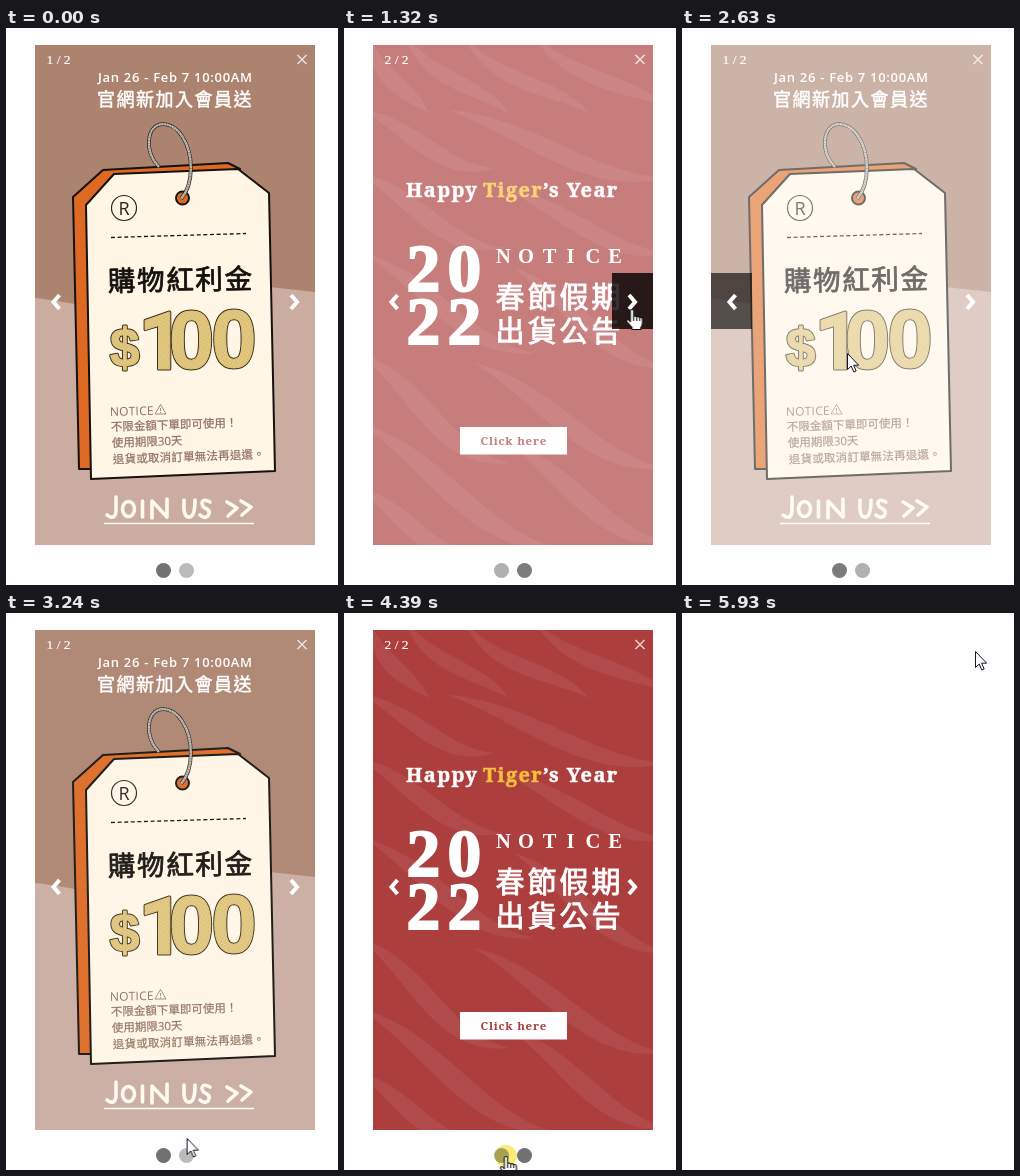
Recreate the animation shown at these times as an HTML page. Size 332x557 px, loop 6080 ms.

```html
<!DOCTYPE html>
<html lang="zh-Hant">
<head>
<meta charset="utf-8">
<title>Popup slideshow</title>
<style>
html, body { margin: 0; width: 100%; height: 100%; overflow: hidden; background: #fefefe; }
svg { display: block; width: 100%; height: 100%; }
text { white-space: pre; }

.sans { font-family: "Open Sans", "Noto Sans", sans-serif; }
.cjk { font-family: "Open Sans", "Noto Sans CJK TC", "Noto Sans CJK JP", "Noto Sans CJK", sans-serif; }
.didone { font-family: "Liberation Serif", serif; font-weight: 700; }
.serif { font-family: "Noto Serif", serif; font-weight: 700; }
.count { font: 13.5px "Liberation Serif", serif; fill: #fff; stroke: #fff; stroke-width: .2; }
.white { fill: #fff; stroke: #fff; stroke-width: 0; }
.line { fill: none; stroke: #fff; }
.ink { stroke: #15110d; stroke-linejoin: round; }
.digits { font-weight: 700; stroke-linejoin: round; }
.edge { fill: #3d301a; stroke: #3d301a; stroke-width: 3; }
.gold { fill: url(#glitter); stroke: url(#glitter); stroke-width: 1; }
.lettering { stroke: #fffaf0; stroke-width: 3.6; stroke-linecap: round; stroke-linejoin: round; }

/* Every track shares one 6080 ms loop */
.track { animation: 6080ms linear infinite; }
#popup { animation-name: popup; animation-timing-function: step-end; }
#one { animation-name: one-fade; }
#one > g { animation-name: one-show; animation-timing-function: step-end; }
#two { animation-name: two-fade; }
#two > g { animation-name: two-show; animation-timing-function: step-end; }
#prev { animation-name: prev; animation-timing-function: ease; }
#next { animation-name: next; animation-timing-function: ease; }
#dot1 { animation-name: dot1; animation-timing-function: ease; }
#dot2 { animation-name: dot2; animation-timing-function: ease; }
#cursor { animation-name: move; animation-timing-function: ease-in-out; }
#pointer { animation-name: pointer; animation-timing-function: step-end; }
#arrow { animation-name: arrow; animation-timing-function: step-end; }
#hand { animation-name: hand; animation-timing-function: step-end; }
#halo { animation-name: move, halo; animation-timing-function: ease-in-out, step-end; mix-blend-mode: multiply; }

@keyframes popup { 0% { opacity: 1 } 92.76%, 100% { opacity: 0 } }
@keyframes one-show {
  0%, 37.66%, 72.86% { visibility: visible }
  16.28%, 59.05%, 100% { visibility: hidden }
}
@keyframes two-show {
  0%, 37.66%, 72.86%, 100% { visibility: hidden }
  16.28%, 59.05% { visibility: visible }
}
@keyframes one-fade {
  0%, 37.65%, 62.33%, 72.85%, 97.53%, 100% { opacity: 1 }
  37.66%, 72.86% { opacity: .4; animation-timing-function: ease }
}
@keyframes two-fade {
  0% { opacity: .4 }
  16.28%, 59.05% { opacity: .4; animation-timing-function: ease }
  40.95%, 59.04%, 83.72%, 100% { opacity: 1 }
}
@keyframes next {
  0%, 11.84%, 38.16%, 100% { fill-opacity: 0 }
  21.71%, 28.29% { fill-opacity: .8 }
}
@keyframes prev {
  0%, 35.69%, 51.64%, 100% { fill-opacity: 0 }
  41.78% { fill-opacity: .76 }
}
@keyframes dot1 {
  0%, 16.28%, 47.53%, 59.05%, 80.59%, 100% { fill: #717171 }
  26.15%, 37.66%, 68.91%, 70.72% { fill: #bbb }
}
@keyframes dot2 {
  0%, 16.28%, 47.53%, 57.24%, 82.73%, 100% { fill: #bbb }
  26.15%, 37.66%, 67.11%, 72.86% { fill: #717171 }
}
@keyframes move {
  0%, 5.76% { transform: translate(316px, 467px) }
  11.5% { transform: translate(296px, 300px) }
  14.14%, 25.66% { transform: translate(288px, 281px) }
  34.38% { transform: translate(85px, 290px) }
  36.18%, 40.3% { transform: translate(50px, 281px) }
  41.94% { transform: translate(90px, 300px) }
  43.26% { transform: translate(165px, 325px) }
  45.72% { transform: translate(172px, 345px) }
  54.6% { transform: translate(181px, 533px) }
  57.24%, 62.5% { transform: translate(186px, 538px) }
  70.72%, 75.66% { transform: translate(162px, 543px) }
  85.03%, 87.99% { transform: translate(288px, 52px) }
  91.45%, 93.42% { transform: translate(296px, 31px) }
  96.22% { transform: translate(293px, 36px) }
  97.53%, 100% { transform: translate(293px, 38px) }
}
@keyframes pointer { 0% { opacity: 0 } 5.76%, 100% { opacity: 1 } }
@keyframes hand {
  0%, 28.29%, 41.78%, 63.32%, 76.3%, 93.1%, 100% { opacity: 0 }
  11.84%, 35.69%, 57.24%, 70.5%, 84.7% { opacity: 1 }
}
@keyframes arrow {
  0%, 28.29%, 41.78%, 63.32%, 76.3%, 93.1%, 100% { opacity: 1 }
  11.84%, 35.69%, 57.24%, 70.5%, 84.7% { opacity: 0 }
}
@keyframes halo {
  0%, 16.9%, 38.3%, 59.7%, 73.2%, 93.4%, 100% { opacity: 0 }
  15.6%, 37%, 58.4%, 71.5%, 92.1% { opacity: 1 }
}
</style>
</head>
<body>
<svg viewBox="0 0 332 557">
  <defs>
    <clipPath id="card"><rect x="29" y="17" width="280" height="500"/></clipPath>
    <pattern id="glitter" width="3" height="3" patternUnits="userSpaceOnUse" patternTransform="rotate(28)">
      <rect width="3" height="3" fill="#dfc47a"/>
      <circle cx=".8" cy=".9" r=".6" fill="#ecd796"/>
      <circle cx="2.2" cy="2.2" r=".5" fill="#cdae5e"/>
    </pattern>
    <path id="rope" d="M175 171C188 156 188 126 176 108C165 91 145 92 143 112C142 125 147 133 153 139"/>
    <g id="amount">
      <text x="104" y="338" font-family="'Liberation Sans', sans-serif" font-size="53">$</text>
      <text x="132.5" y="340.5" font-family="Roboto, sans-serif" font-size="80">1</text>
      <text x="163 205.5" y="340 339" font-family="'Liberation Sans', sans-serif" font-size="81">00</text>
    </g>
  </defs>

  <g id="popup" class="track">
    <g id="one" class="track" clip-path="url(#card)"><g class="track">
      <rect x="29" y="17" width="280" height="500" fill="#ac836f"/>
      <path d="M29 270C60 273 90 283 150 280S240 256 268 259.5L309 264V517H29Z" fill="#caaca0"/>
      <text x="40.5" y="36" class="count">1 / 2</text>
      <g class="white">
        <text x="92" y="54" class="sans" font-size="13" font-weight="600" letter-spacing=".7">Jan 26 - Feb 7 10:00AM</text>
        <text x="91" y="77.5" class="cjk" font-size="18" letter-spacing="1.5" stroke-width=".5" style="stroke-width: .5">官網新加入會員送</text>
      </g>

      <g class="ink" stroke-width="2">
        <path d="M67 169L97 142L222 135L234 141L85 441H73Z" fill="#de6923"/>
        <path d="M80 177L108 146L232 141L263 165L269 443L85 451Z" fill="#fff6e6"/>
        <circle cx="176.5" cy="170" r="6.5" fill="#de6923"/>
      </g>
      <g fill="none">
        <use href="#rope" stroke="#29241f" stroke-width="3.8"/>
        <use href="#rope" stroke="#c3bdb3" stroke-width="2.3"/>
        <use href="#rope" stroke="#77716a" stroke-width="2" stroke-dasharray=".7 2"/>
        <circle cx="118" cy="180" r="12.5" stroke="#2a241f" stroke-width="1.2"/>
        <path d="M105 209.5L240 205.5" stroke="#15110d" stroke-width="1.3" stroke-dasharray="4 2.6"/>
      </g>
      <text x="118" y="186.5" class="sans" font-size="18" text-anchor="middle" fill="#2a241f">R</text>

      <text class="cjk ink" transform="translate(102 263) rotate(-1)" font-size="27.5" letter-spacing="1.7" fill="#15110d" stroke-width=".8">購物紅利金</text>
      <g class="digits">
        <use href="#amount" class="edge"/>
        <use href="#amount" class="gold"/>
      </g>

      <g class="cjk" fill="#8f6f5e" font-size="11.5">
        <text transform="translate(104 388) rotate(-1.5)" font-size="12" letter-spacing=".3">NOTICE</text>
        <path d="M154.5 376.5L160 386H149ZM154.5 380V383M154.5 384V385" fill="none" stroke="#8f6f5e" stroke-width=".8"/>
        <g stroke="#8f6f5e" stroke-width=".2">
          <text transform="translate(105 403) rotate(-2)">不限金額下單即可使用！</text>
          <text transform="translate(106 419) rotate(-2)">使用期限30天</text>
          <text transform="translate(107 435.5) rotate(-2)" letter-spacing=".2">退貨或取消訂單無法再退還。</text>
        </g>
      </g>

      <g class="line lettering" role="img" aria-label="JOIN US &gt;&gt;">
        <path d="M110 469V483Q109 493 101 487"/>
        <ellipse cx="122.5" cy="481" rx="6" ry="7.5"/>
        <path d="M136.500 473V489M146 490V473L161 489V471"/>
        <path d="M178 472V482Q179 490 184 489Q189 488 189 472"/>
        <path d="M204 474Q197 470 196 475Q196 479 201 481Q205 484 202 488Q198 491 194 487"/>
        <path id="chevron" d="M221 474L231 480L222 488"/>
        <use href="#chevron" x="14" y="-1"/>
        <path d="M98 495.5H248" stroke-width="1.6" stroke-linecap="butt"/>
      </g>
    </g></g>

    <g id="two" class="track" clip-path="url(#card)"><g class="track">
      <rect x="29" y="17" width="280" height="500" fill="#a42929"/>
      <path id="stripes" fill="#fff" fill-opacity=".06"/>
      <text x="40.5" y="36" class="count">2 / 2</text>
      <g class="serif" fill="#fff" stroke="#fff" font-size="20" letter-spacing="1.4" stroke-width=".5">
        <text x="62" y="169">Happy</text>
        <text x="139" y="169" fill="#f5b726" stroke="#f5b726">Tiger</text>
        <text x="199" y="169">’s Year</text>
      </g>
      <g class="didone" fill="#fff" stroke="#fff">
        <g font-size="67.5" stroke-width="2">
          <text x="62.5 103.5" y="262.5">20</text>
          <text x="62.5 103.5" y="316">22</text>
        </g>
        <text x="159.5 182 205.5 226.5 249 271" y="235" font-size="20.5" stroke-width="0" text-anchor="middle">NOTICE</text>
      </g>
      <g class="cjk" fill="#fff" stroke="#fff" stroke-width=".9" font-size="29" letter-spacing="3">
        <text x="151.5" y="280">春節假期</text>
        <text x="151.5" y="314">出貨公告</text>
      </g>
      <rect x="116" y="399" width="107" height="27.5" fill="#fff"/>
      <text x="136.5" y="417" class="serif" font-size="11.5" letter-spacing=".75" fill="#a42929">Click here</text>
    </g></g>

    <rect id="prev" class="track" x="29" y="245" width="41" height="56" fill-opacity="0"/>
    <rect id="next" class="track" x="268" y="245" width="41" height="56" fill-opacity="0"/>
    <path class="line" d="M53.5 267L47.5 274L53.5 281M285 267L291 274L285 281" stroke-width="4"/>
    <path class="line" d="M291.5 27L300.5 36M300.5 27L291.5 36" stroke-width="1.5" stroke-opacity=".75"/>
    <circle id="dot1" class="track" cx="157.5" cy="542.5" r="7.5"/>
    <circle id="dot2" class="track" cx="180.5" cy="542.5" r="7.5"/>
  </g>

  <circle id="halo" class="track" r="11" fill="#faec78"/>
  <g id="cursor" class="track"><g id="pointer" class="track">
    <path id="arrow" class="track" d="M.5 .5V16.5L4.2 13L6.8 19L9.2 18L6.6 12.2H11.7Z" fill="#fff" stroke="#14142a"/>
    <path id="hand" class="track" transform="scale(1.1 1)" d="M-1.5 13V1.5Q-1.5 .5 0 .5T1.5 1.5V7.5Q3 6.5 4.3 8Q6 7 7 8.7Q9.5 8 9.5 10.5V14Q9.5 17 8 18.5V20.5H0V18.5L-4.5 13Q-5.5 11 -4 10.5Q-2.8 10.5 -1.5 13ZM1.5 7.5V12M4.3 8V12M7 8.7V12" fill="#fff" stroke="#111"/>
  </g></g>
</svg>
<script>
// Tapered wavy stripe between two points: bend sets the wave, width swells its middle.
function stripe([x1, y1, x2, y2, bend, width]) {
  const length = Math.hypot(x2 - x1, y2 - y1);
  const nx = (y1 - y2) / length, ny = (x2 - x1) / length;
  const control = (along, k) => `${x1 + (x2 - x1) * along + nx * k} ${y1 + (y2 - y1) * along + ny * k}`;
  return `M${x1} ${y1}C${control(.35, bend)} ${control(.7, -bend)} ${x2} ${y2}` +
    `C${control(.7, width - bend)} ${control(.35, width + bend)} ${x1} ${y1}Z`;
}

const stripes = [
  [26, 10, 85, 85, 8, 22], [60, 5, 165, 85, 14, 20], [120, 8, 245, 85, 16, 20],
  [190, 8, 322, 78, 12, 20], [18, 82, 150, 140, -16, 22], [105, 82, 322, 150, -18, 24],
  [15, 145, 160, 220, -18, 24], [160, 160, 325, 225, -16, 22], [20, 225, 190, 325, -20, 24],
  [170, 240, 325, 340, -18, 24], [15, 325, 165, 435, -24, 26], [15, 395, 215, 520, -26, 28],
  [130, 335, 322, 440, -22, 26], [165, 415, 325, 515, -20, 26], [15, 460, 130, 525, -16, 24],
];
document.getElementById("stripes").setAttribute("d", stripes.map(stripe).join(""));
</script>
</body>
</html>
```
